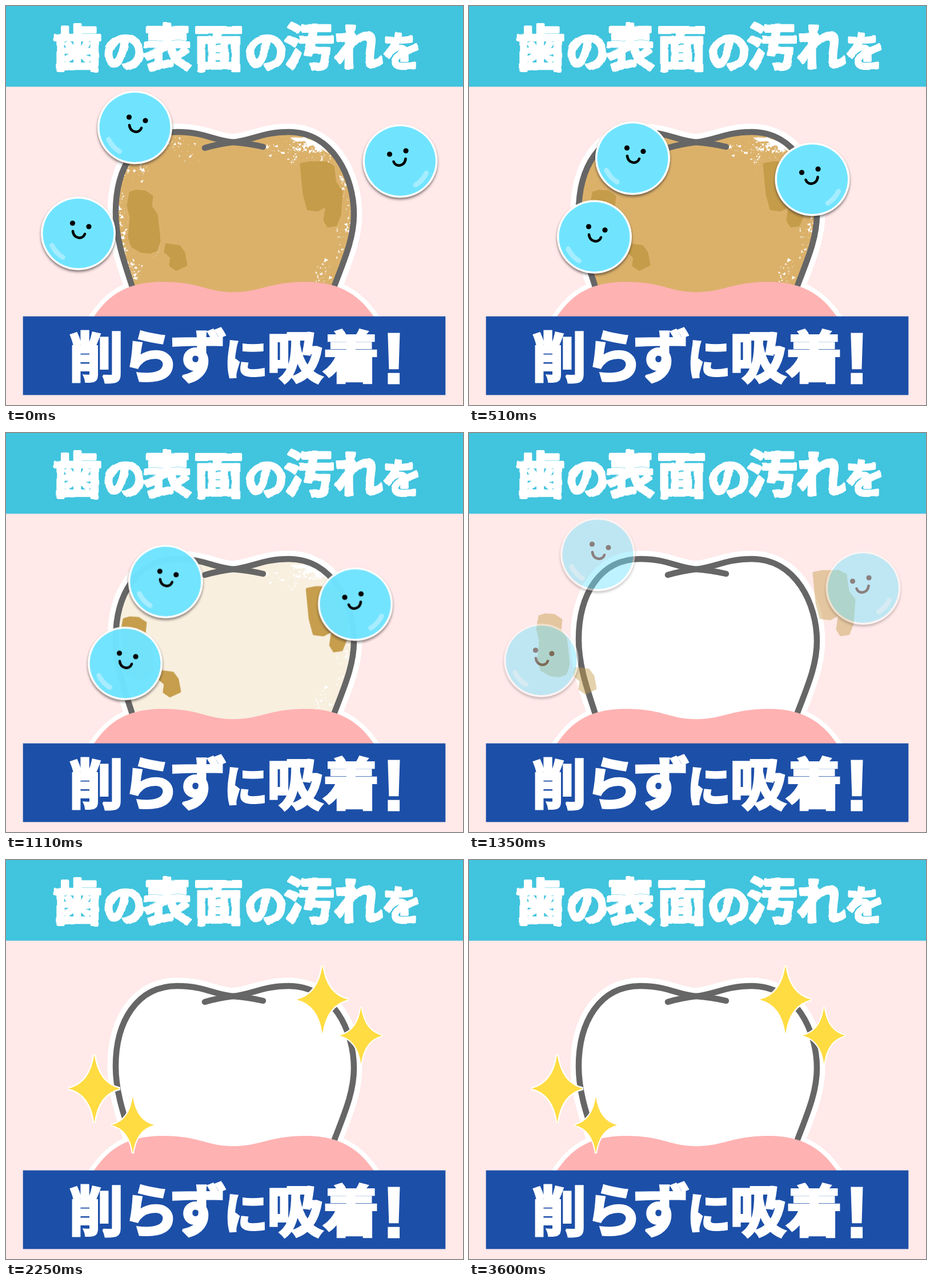
An HTML page for the animation above (3.75 s loop, 800x700 px).

```html
<!DOCTYPE html>
<html lang="ja">
<head>
<meta charset="utf-8">
<title>歯の表面の汚れを削らずに吸着!</title>
<style>
  html, body { margin: 0; width: 100%; height: 100%; overflow: hidden; background: #ffe9e9; }
  svg { display: block; width: 800px; height: 700px; }
  text {
    font-family: "Noto Sans CJK JP", "Noto Sans CJK", sans-serif;
    font-weight: 900; text-anchor: middle;
    fill: #fff; stroke: #fff; stroke-linejoin: round;
  }
  .title text { stroke-width: 4.5; }
  .banner text { stroke-width: 4; stroke-linejoin: miter; stroke-miterlimit: 2; }
  .banner .bang { font-family: "Liberation Sans", Arial, sans-serif; font-weight: 700; stroke-width: 3; }

  .fly, .carried, .dirt, .loose, .stars { animation: 3750ms linear infinite; }
  .fly { animation-name: fly; }
  .carried { animation-name: carry; }
  .dirt { animation-name: clean; }
  .loose { animation-name: settle; }
  .stars { animation-name: shine; }
  .ball { filter: drop-shadow(0 3px 2px rgba(50, 40, 40, .6)); }

  /* --x, --y: way from the resting place to the tooth */
  @keyframes fly {
    0% { transform: none; opacity: 1; animation-timing-function: ease-in-out; }
    13.33%, 28.8% { transform: translate(var(--x), var(--y)); opacity: 1; }
    28.8% { animation-timing-function: linear; }
    29.33% { opacity: 1; }
    35.8% { transform: none; }
    41.6%, 100% { transform: none; opacity: 0; }
  }
  @keyframes carry {
    0%, 28.8% { transform: none; opacity: 1; }
    29.33% { opacity: 1; }
    35.8% { transform: translate(calc(-1 * var(--x)), calc(-1 * var(--y))); }
    41.6%, 100% { transform: translate(calc(-1 * var(--x)), calc(-1 * var(--y))); opacity: 0; }
  }
  @keyframes clean {
    0%, 16% { opacity: 1; }
    33.33%, 100% { opacity: 0; }
  }
  @keyframes settle {
    0% { opacity: 1; }
    12%, 100% { opacity: 0; }
  }
  @keyframes shine {
    0%, 43.2% { opacity: 0; }
    49.6%, 100% { opacity: 1; }
  }
</style>
</head>
<body>
<svg viewBox="0 0 800 700">
  <defs>
    <filter id="rough" x="-10%" y="-10%" width="120%" height="120%" color-interpolation-filters="sRGB">
      <feTurbulence type="fractalNoise" baseFrequency=".06" numOctaves="1" seed="4"/>
      <feDisplacementMap in="SourceGraphic" scale="4" xChannelSelector="R" yChannelSelector="G"/>
    </filter>
    <path id="crown" d="M222 496C212 462 192 415 192 362C192 285 228 221 300 221C346 221 364 236 397 239C430 236 450 221 495 221C572 221 609 300 609 365C609 410 590 450 573 496V515H222Z"/>
    <path id="gum" d="M152 548C176 512 205 484 275 484C340 484 350 502 398 502C446 502 460 484 525 484C590 484 622 512 646 548Z"/>
    <clipPath id="inside"><use href="#crown"/></clipPath>
    <g id="ball">
      <ellipse rx="65.5" ry="64.5" fill="#fff"/>
      <ellipse rx="62" ry="61" fill="#70e4ff"/>
      <path d="M-46 21Q-39 35-27 42" fill="none" stroke="#a5edff" stroke-width="8.5" stroke-linecap="round"/>
      <circle cx="-10" cy="-18" r="4.6"/>
      <circle cx="18.5" cy="-12" r="4.6"/>
      <path d="M-9.500-4C-8 10 8 11 11.500 1" fill="none" stroke="#000" stroke-width="4.6" stroke-linecap="round"/>
    </g>
    <path id="star" d="M0-60Q7-9 45 0Q7 9 0 60Q-7 9-45 0Q-7-9 0-60Z" fill="#ffdc42" stroke="#fff" stroke-width="5" stroke-miterlimit="3" paint-order="stroke"/>
  </defs>

  <rect width="800" height="700" fill="#ffe9e9"/>
  <rect width="800" height="141.6" fill="#41c4de"/>
  <g class="title" filter="url(#rough)">
    <text x="125" y="106" font-size="86">歯</text>
    <text x="207" y="107" font-size="74">の</text>
    <text x="282" y="105" font-size="86">表</text>
    <text x="372" y="106" font-size="86">面</text>
    <text x="455" y="107" font-size="74">の</text>
    <text x="530" y="104" font-size="87">汚</text>
    <text x="617" y="105" font-size="86">れ</text>
    <text x="693" y="106" font-size="70">を</text>
  </g>

  <g fill="#fff" stroke="#fff" stroke-linejoin="round">
    <use href="#crown" stroke-width="29"/>
    <use href="#gum" stroke-width="16"/>
  </g>
  <g clip-path="url(#inside)">
    <g class="dirt">
      <use href="#crown" fill="#dbb16a"/>
      <path class="loose" id="leftSpecks" fill="#fff"/>
      <path id="rightSpecks" fill="#fff"/>
      <path d="M497 231Q525 228 552 243L566 260L553 251L546 256L538 244L528 247L524 237L508 238Z" fill="#fff"/>
    </g>
  </g>
  <g fill="none" stroke="#666" stroke-width="10.5" stroke-linecap="round">
    <path d="M222 496C212 462 192 415 192 362C192 285 228 221 300 221C346 221 364 236 397 239Q425 241 450 247"/>
    <path d="M573 496C590 450 609 410 609 365C609 300 572 221 495 221C450 221 430 236 397 239Q372 242 348 249"/>
  </g>
  <use href="#gum" fill="#ffb2b2"/>

  <g fill="#c59c49" stroke="#c59c49" stroke-width="5" stroke-linejoin="round">
    <g class="carried" style="--x:94px;--y:6px">
      <path d="M218 328L228 325 243 326 255 334 253 352 263 366 266 390 268 412 263 428 252 432 236 430 221 421 216 405 219 370 214 350Z"/>
      <path d="M281 419L303 422 311 433 315 454 298 462 288 455 290 441 279 431Z"/>
    </g>
    <g class="carried" style="--x:-87px;--y:32px">
      <path d="M517 278L532 275 560 275 572 281 576 310 587 325 584 367 577 384 564 386 558 376 562 349 545 358 529 356 522 330Z"/>
    </g>
  </g>

  <g class="fly" style="--x:61px;--y:54px"><g transform="translate(225.5 213)"><use class="ball" href="#ball"/></g></g>
  <g class="fly" style="--x:93px;--y:6px"><g transform="translate(126.500 399)"><use class="ball" href="#ball"/></g></g>
  <g class="fly" style="--x:-89px;--y:32px"><g transform="translate(690 272) scale(-1 1)"><use class="ball" href="#ball"/></g></g>

  <g class="stars">
    <use href="#star" transform="translate(554 245)"/>
    <use href="#star" transform="translate(621.5 308) scale(.83)"/>
    <use href="#star" transform="translate(154.5 401)"/>
    <use href="#star" transform="translate(222 465) scale(.83)"/>
  </g>

  <rect x="29.700" y="544.5" width="739.600" height="138" fill="#1c4fa8"/>
  <g class="banner">
    <text x="158" y="652" font-size="95">削</text>
    <text x="253" y="652" font-size="100">ら</text>
    <text x="337" y="651" font-size="100">ず</text>
    <text x="420" y="648" font-size="76">に</text>
    <text x="506" y="652" font-size="98">吸</text>
    <text x="604" y="652" font-size="98">着</text>
    <text class="bang" x="679" y="662" font-size="126">!</text>
  </g>
</svg>
<script>
  let seed = 11;
  const rand = () => (seed = seed * 16807 % 2147483647) / 2147483647;
  const spread = () => rand() + rand() - 1;

  // One ragged three-sided fleck
  function fleck(x, y, r) {
    const turn = rand() * 6.28;
    const corners = [0, 2.1, 4.2].map(a => {
      const d = r * (.4 + 1.2 * rand());
      return (x + d * Math.cos(a + turn)).toFixed(1) + " " + (y + d * Math.sin(a + turn)).toFixed(1);
    });
    return "M" + corners.join("L") + "Z";
  }

  // Each cluster: centre x, y, half width, half height, count
  function scatter(id, clusters) {
    let d = "";
    for (const [x, y, w, h, n] of clusters)
      for (let i = 0; i < n; i++)
        d += fleck(x + spread() * w, y + spread() * h, .6 + 3.4 * rand() ** 4);
    document.getElementById(id).setAttribute("d", d);
  }

  scatter("leftSpecks", [
    [201, 345, 8, 70, 50], [206, 420, 12, 50, 60], [224, 468, 18, 30, 70],
    [232, 285, 28, 28, 40], [305, 250, 40, 24, 40], [268, 425, 22, 20, 10]
  ]);
  scatter("rightSpecks", [
    [530, 243, 42, 18, 150], [560, 266, 35, 24, 50], [592, 305, 14, 45, 50],
    [502, 262, 12, 26, 30], [470, 254, 24, 14, 25], [553, 468, 18, 26, 40],
    [588, 420, 12, 50, 30], [599, 370, 7, 40, 20]
  ]);
</script>
</body>
</html>
```
